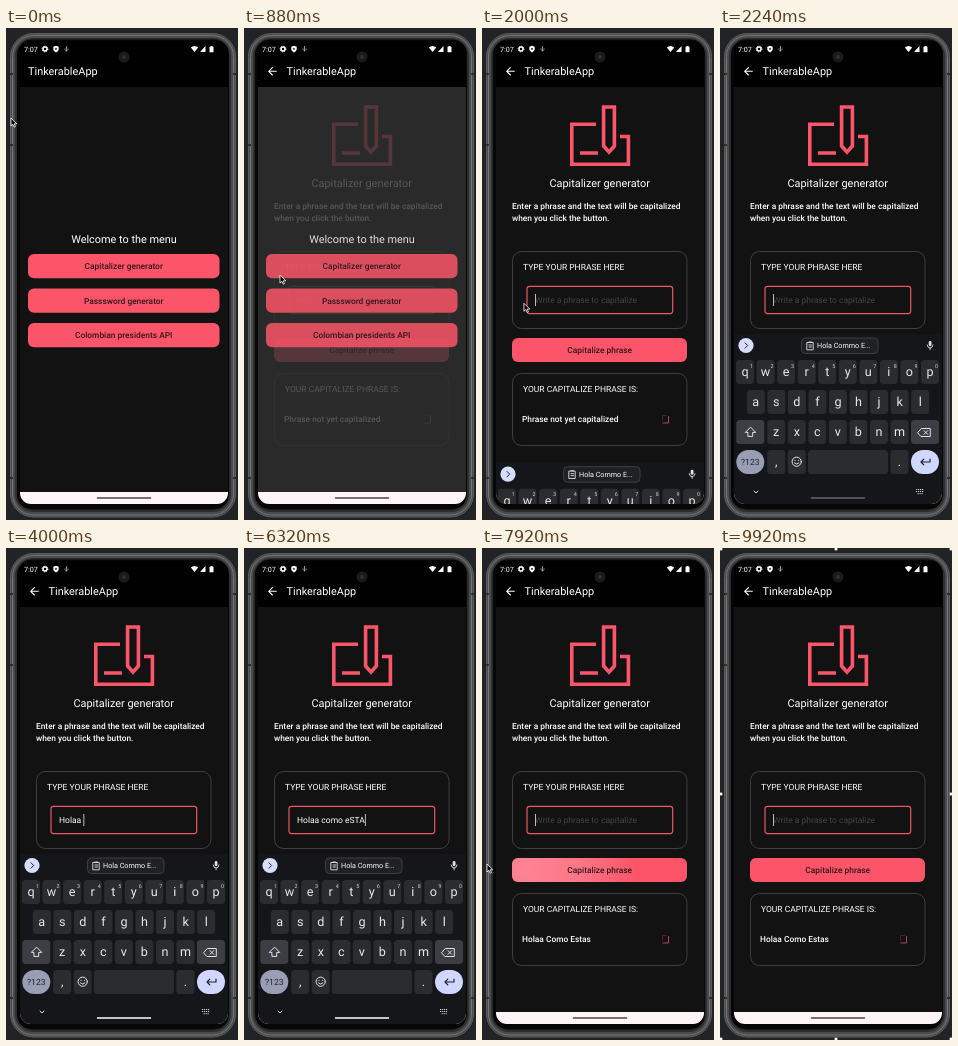
Write an HTML page that moves like this. It is 232 px wide and 492 px high and loops after 10000 ms.

```html
<!DOCTYPE html>
<html lang="en">
<head>
<meta charset="utf-8">
<title>Capitalizer demo</title>
<style>
html, body { margin: 0; width: 100%; height: 100%; overflow: hidden; background: #222326; }
svg { display: block; width: 232px; height: 492px; }
text { font: 8.5px Roboto, sans-serif; fill: #fff; white-space: pre; text-rendering: geometricPrecision; }
.title { font-size: 10.9px; }
.medium { font-size: 8.35px; font-weight: 500; }
.small { font-size: 7.2px; }
.mid { text-anchor: middle; }
.on-pink { font-size: 8.4px; font-weight: 500; fill: #35141a; }
.key { font-size: 12.6px; fill: #e8e8ea; text-anchor: middle; }
.digit { font-size: 5.4px; fill: #d0d0d4; }
.line { fill: none; stroke: #e3e2e9; stroke-linecap: round; stroke-linejoin: round; }
.card { fill: none; stroke: #444; stroke-width: .9; }
</style>
</head>
<body>
<svg viewBox="0 0 232 492">
  <defs>
    <clipPath id="screen"><rect x="14" y="13" width="208" height="463" rx="11"/></clipPath>
    <clipPath id="buttonShape"><rect x="30" y="310" width="175" height="24" rx="6"/></clipPath>
    <radialGradient id="glow">
      <stop offset="0" stop-color="#fff" stop-opacity=".28"/>
      <stop offset=".5" stop-color="#fff" stop-opacity=".2"/>
      <stop offset="1" stop-color="#fff" stop-opacity="0"/>
    </radialGradient>
  </defs>

  <!-- phone body -->
  <rect x="4.5" y="5.5" width="225" height="483.5" rx="23" fill="#4a4b4c" stroke="#5c5d5e"/>
  <rect x="6.5" y="7.5" width="221" height="479.5" rx="21" fill="none" stroke="#757677"/>
  <rect x="9" y="10" width="216" height="474" rx="18" fill="#2c2d2e"/>
  <rect x="11" y="11.5" width="212" height="470" rx="15" fill="#060606"/>
  <path d="M4 46h3M4 117h3M227 46h3M227 450h3M4 450h3" stroke="#222" stroke-width="1.5"/>

  <g clip-path="url(#screen)">
    <path fill="#000" d="M14 13h208v46H14z"/>
    <path fill="#121212" d="M14 59h208v405H14z"/>

    <text class="small" x="18" y="23.5">7:07</text>
    <circle cx="39" cy="21" r="2" fill="none" stroke="#fff" stroke-width="1.5"/>
    <circle cx="39" cy="21" r="2.9" fill="none" stroke="#fff" stroke-dasharray="1.1 1.2"/>
    <path d="M50 17.8l2.7 1v2.4q0 2-2.7 3.2q-2.7-1.2-2.7-3.2v-2.4z" fill="#fff"/>
    <circle cx="50" cy="20.8" r=".9"/>
    <path d="M60.5 18v5.5M59 20.5v1q1.5 3 3 0v-1" fill="none" stroke="#bbb" stroke-width=".8"/>
    <path d="M184.8 19.4q3.7-3 7.4 0l-3.7 4.6z M194 24h5.5v-6z M203.5 18.8h1v-.9h2v.9h1v5.4h-4z" fill="#fff"/>
    <circle cx="118" cy="29" r="5.6" fill="#1a1a1b"/>
    <circle cx="118" cy="29" r="2" fill="#2f3033"/>

    <path id="back" class="line" style="stroke:#fff" d="M32.3 43.3h-7.5m3.6-3.7l-3.7 3.7 3.7 3.7" stroke-width="1.1"/>
    <text id="appName" class="title" y="47">TinkerableApp</text>

    <g id="detail">
      <g fill="none" stroke="#fc5569" stroke-width="3.6">
        <path d="M114 96.2H89.8V136.3H146.4V108.5H138"/>
        <path d="M121.6 79H132.4V118L127 124L121.6 118z"/>
        <path d="M98 125h18"/>
      </g>
      <text class="title mid" x="117.7" y="159">Capitalizer generator</text>
      <text class="medium" x="30" y="181">Enter a phrase and the text will be capitalized</text>
      <text class="medium" x="30" y="193">when you click the button.</text>

      <rect class="card" x="30.5" y="223.5" width="174.5" height="77" rx="9"/>
      <text x="41" y="242">TYPE YOUR PHRASE HERE</text>
      <rect id="field" x="45" y="258.3" width="145.7" height="27.3" rx="2.5" fill="none"/>
      <text id="hint" x="53" y="274.6">Write a phrase to capitalize</text>
      <text id="typed" x="53" y="274.6"></text>
      <rect id="caret" y="266" width="1" height="12" fill="#bbb"/>

      <g clip-path="url(#buttonShape)">
        <path fill="#fc5569" d="M30 310h175v24H30z"/>
        <circle id="ripple" cx="40" cy="322" fill="url(#glow)"/>
      </g>
      <text class="mid on-pink" x="117.7" y="325">Capitalize phrase</text>

      <rect class="card" x="30.5" y="345.5" width="174.5" height="72" rx="9"/>
      <text x="41" y="363.5">YOUR CAPITALIZE PHRASE IS:</text>
      <text id="result" class="medium" x="40" y="394"></text>
      <path d="M180.5 393v-5.5h4.5" fill="none" stroke="#4a2026"/>
      <path d="M186.5 388v7h-6" fill="none" stroke="#c8465a" stroke-width=".9"/>
    </g>
    <path id="veil" fill="#fff" d="M14 59h208v405H14z"/>

    <g id="menu">
      <text class="title mid" x="118" y="215">Welcome to the menu</text>
    </g>

    <path fill="#fff4f6" d="M14 464h208v13H14z"/>
    <path d="M91.5 470h53" stroke="#4a4647" stroke-width="1.5" stroke-linecap="round"/>

    <g id="keyboard">
      <path fill="#15161a" d="M14 306h208v172H14z"/>
      <circle cx="26" cy="317.5" r="7.6" fill="#d6ddff"/>
      <path class="line" style="stroke:#20232e" d="M25 314.8l2.7 2.7-2.7 2.7"/>
      <rect x="81.5" y="310" width="76.5" height="15.5" rx="4" fill="#1f2124" stroke="#3c3e45"/>
      <path class="line" d="M87.2 314.5h6v7.3h-6zM89 314h2.5M89 317h2.5M89 319h2.5" stroke-width=".9"/>
      <text class="small" x="97" y="320">Hola Commo E...</text>
      <rect x="208.7" y="313" width="2.8" height="5.2" rx="1.4" fill="#e3e2e9"/>
      <path class="line" d="M207.2 317q.3 3 2.9 3q2.6 0 2.9-3M210.1 320v1.8" stroke-width=".9"/>
      <g id="keys"></g>
      <path class="line" d="M30.3 399.4l-5 5h2.6v4h4.8v-4h2.6z"/>
      <path class="line" d="M197.8 404.5l3.5-4h9v8h-9zM204 402.6l3.8 3.8m0-3.8l-3.8 3.8"/>
      <circle class="line" cx="76.7" cy="433.7" r="4.6"/>
      <path class="line" d="M75 432.3v.2M78.4 432.3v.2M74.5 435q2.2 2.4 4.4 0"/>
      <path class="line" style="stroke:#20232e" d="M210 431v3h-9m2.8-2.8l-2.8 2.8 2.8 2.8" stroke-width="1.2"/>
      <path class="line" d="M34 463l2 2 2-2"/>
      <path class="line" d="M196.5 461.5h7.5M196.5 463.5h7.5M198 465.7h4.5" stroke-dasharray=".3 1.7"/>
      <path id="handle" d="M91.5 470h53" stroke="#fff" stroke-width="1.5" stroke-linecap="round"/>
    </g>
  </g>

  <path id="pointer" d="M0 0v8l1.9-1.7 1.3 2.9 1.3-.6-1.3-2.8h2.6z" fill="#000" stroke="#fff" stroke-width=".8"/>
  <g id="grips" fill="#fff" stroke="#444" stroke-width=".5"></g>
</svg>

<script>
const $ = id => document.getElementById(id);
const LOOP = 10000;
const PHRASE = 'Holaa como eSTAS';
const STROKES = [2880, 3040, 3200, 3360, 3520, 3680, 4480, 4560, 4720, 4800, 5040, 5520, 6080, 6160, 6320, 6640];
const OPEN = 800, FOCUS = 1880, SUBMIT = 7680, SELECT = 8880;
const POINTER = [
  [0, 5, 90], [640, 36, 246], [880, 36, 247], [1100, -14, 262], [1300, -14, 275],
  [1760, 62, 270], [1900, 62, 270], [2200, -14, 290], [7320, -14, 330],
  [7600, 40, 322], [7720, 40, 322], [7920, 5, 316], [8040, -14, 318]
];

const add = (id, markup) => $(id).insertAdjacentHTML('beforeend', markup);
const set = (id, attrs) => { for (const k in attrs) $(id).setAttribute(k, attrs[k]); };
const ramp = (t, from, to) => Math.min(1, Math.max(0, (t - from) / (to - from)));
const smooth = p => p * p * (3 - 2 * p);

['Capitalizer generator', 'Passsword generator', 'Colombian presidents API'].forEach((label, i) => {
  const y = 226 + i * 34.5;
  add('menu', `<rect x="22" y="${y}" width="191.5" height="24.3" rx="6" fill="#fc5569"/>
    <text class="mid on-pink" x="117.7" y="${y + 15}">${label}</text>`);
});

function addKey(x, y, width, label, fill = '#2b2c2f', radius = 3.5) {
  add('keys', `<rect x="${x - width / 2}" y="${y - 12}" width="${width}" height="24" rx="${radius}" fill="${fill}"/>
    <text class="key" x="${x}" y="${y + 4}">${label}</text>`);
}
[['qwertyuiop', 25], ['asdfghjkl', 35.8], ['zxcvbnm', 56.2]].forEach(([row, x0], r) =>
  [...row].forEach((letter, i) => {
    const x = x0 + i * 20.55, y = 344 + r * 30;
    addKey(x, y, 18, letter);
    if (!r) add('keys', `<text class="digit" x="${x + 5}" y="${y - 4.5}">${(i + 1) % 10}</text>`);
  }));
addKey(30.3, 404, 28, '', '#3c3e43');
addKey(205, 404, 28, '', '#3c3e43');
addKey(30.3, 434, 28, '<tspan dy="-1" style="font-size:8.6px;fill:#20232e">?123</tspan>', '#9a9eb4', 12);
addKey(56.2, 434, 18, ',');
addKey(76.7, 434, 18, '');
addKey(128, 434, 80, '');
addKey(179.5, 434, 18, '.');
addKey(205, 434, 28, '', '#d0d7ff', 12);

for (const x of [1, 116, 231])
  for (const y of [1, 246, 491])
    if (x !== 116 || y !== 246) add('grips', `<circle cx="${x}" cy="${y}" r="1.7"/>`);

function pointerAt(t) {
  const i = POINTER.findIndex(p => p[0] > t);
  if (i < 0) return [-14, 0];
  const [t0, x0, y0] = POINTER[i - 1], [t1, x1, y1] = POINTER[i];
  const p = smooth(ramp(t, t0, t1));
  return [x0 + (x1 - x0) * p, y0 + (y1 - y0) * p];
}

function draw(t) {
  const opened = t >= OPEN, focused = t >= FOCUS, sent = t >= SUBMIT;
  set('back', { opacity: +opened });
  set('appName', { x: opened ? 42.5 : 22 });
  set('menu', { opacity: 1 - smooth(ramp(t, OPEN, 1040)) * .6 - ramp(t, 900, 1040) * .4 });
  set('detail', { opacity: smooth(ramp(t, OPEN, 1080)) });
  set('veil', { opacity: .1 * ramp(t, 760, 860) * (1 - ramp(t, 1140, 1320)) });

  const count = sent ? 0 : STROKES.filter(s => s <= t).length;
  $('typed').textContent = PHRASE.slice(0, count);
  set('hint', { style: `fill:${focused ? '#454545' : '#a2a2a2'}`, opacity: count ? 0 : 1 });
  set('field', { stroke: focused ? '#f25266' : '#808080', 'stroke-width': focused ? 1.2 : .9 });
  const lastEdit = sent ? SUBMIT : count ? STROKES[count - 1] : FOCUS;
  set('caret', {
    x: 53 + (count ? $('typed').getComputedTextLength() : 0),
    opacity: +(focused && (t - lastEdit) % 1000 < 500)
  });
  $('result').textContent = sent ? 'Holaa Como Estas' : 'Phrase not yet capitalized';
  set('ripple', { r: 20 + 170 * ramp(t, SUBMIT, 8120), opacity: sent ? 1 - ramp(t, 7960, 8320) : 0 });

  const hidden = 1 - smooth(ramp(t, 1920, 2160)) + smooth(ramp(t, 6800, 7160));
  set('keyboard', { transform: `translate(0 ${hidden * 175})` });
  set('handle', { opacity: .35 + .65 * ramp(t, 2800, 3200) });

  set('pointer', { transform: `translate(${pointerAt(t)})` });
  set('grips', { opacity: +(t >= SELECT) });
}

function frame() {
  draw(performance.now() % LOOP);
  requestAnimationFrame(frame);
}
frame();
</script>
</body>
</html>
```
